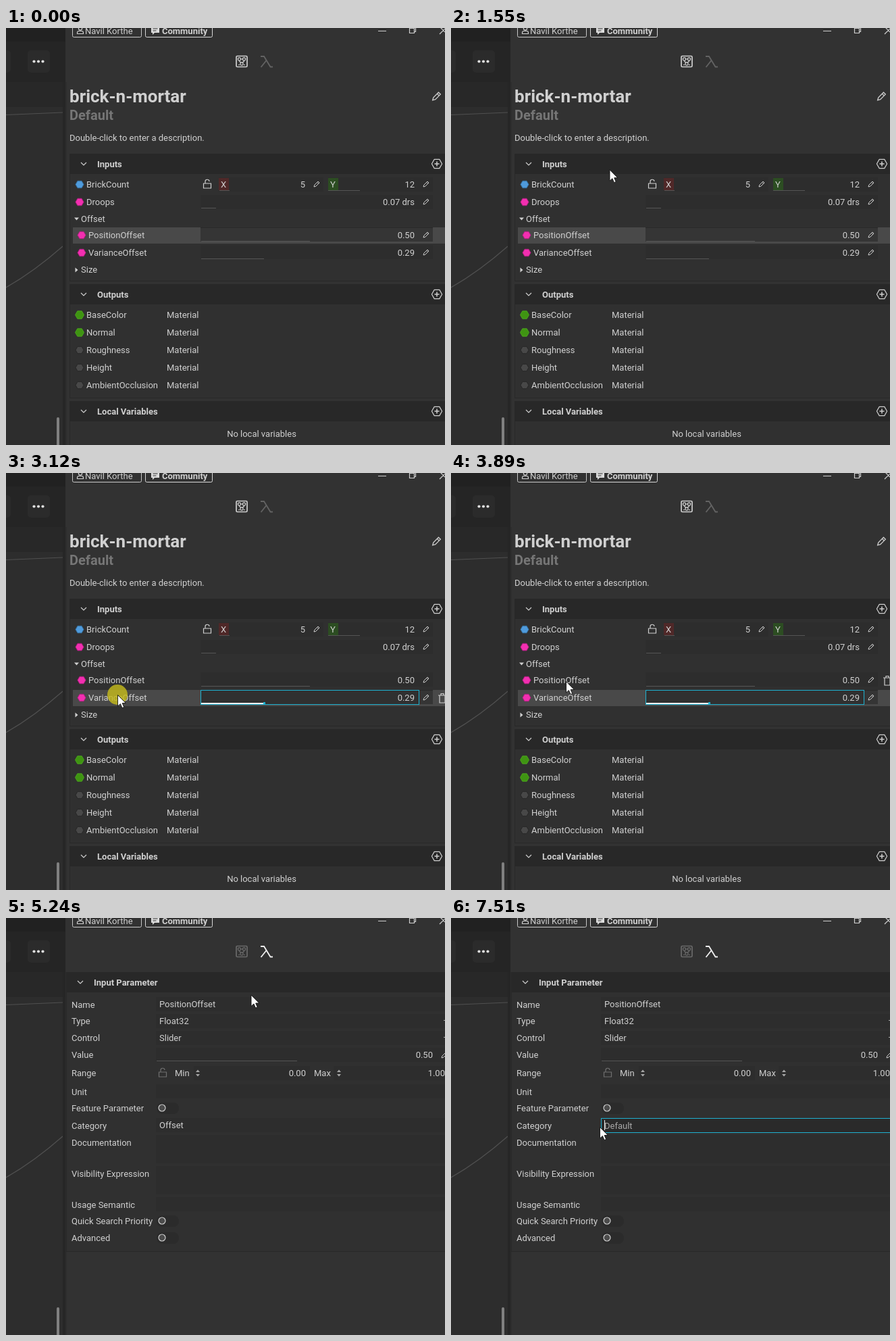
An HTML page for the animation above (8000 ms loop, 650 by 617 pixels).

```html
<!DOCTYPE html>
<html lang="en">
<head>
<meta charset="utf-8">
<title>Parameter panel</title>
<style>
html, body { margin: 0; width: 100%; height: 100%; overflow: hidden; background: #323232; }
svg { display: block; width: 650px; height: 617px; }
text { font: 13px Roboto, sans-serif; fill: #d0d0d0; white-space: pre; }
.bold { font-weight: 700; }
.line { fill: none; stroke: #cfcfcf; stroke-width: 1.2; }
.end { text-anchor: end; }
</style>
</head>
<body>
<svg id="stage" viewBox="0 0 650 617"></svg>
<script>
const rect = (x, y, w, h, fill, more = '') =>
  `<rect x="${x}" y="${y}" width="${w}" height="${h}" fill="${fill}" ${more}/>`;
const frame = (x, y, w, h, stroke, more = '') =>
  rect(x + .5, y + .5, w - 1, h - 1, 'none', `stroke="${stroke}" ${more}`);
// Text is placed by the vertical centre of its capitals.
const text = (x, cy, s, cls = '', more = '') =>
  `<text x="${x}" y="${cy + 5}" class="${cls}" ${more}>${s}</text>`;
const line = (d, more = '') => `<path class="line" d="${d}" ${more}/>`;
const at = (x, y, s, more = '') => `<g transform="translate(${x} ${y})" ${more}>${s}</g>`;
const group = (id, s) => `<g id="${id}">${s}</g>`;
const circle = (x, y, r, fill, more = '') => `<circle cx="${x}" cy="${y}" r="${r}" fill="${fill}" ${more}/>`;

const hexPath = r => {
  const h = r * .87;
  return `M${-r} 0L${-r / 2} ${-h}H${r / 2}L${r} 0L${r / 2} ${h}H${-r / 2}Z`;
};
const port = (x, y, fill, rim, r = 6) =>
  at(x, y, `<path d="${hexPath(r)}" fill="${fill}" stroke="${rim}" stroke-linejoin="round"/>`);
const pencil = (x, y, k = 1, more = '') =>
  at(x, y, line('M-4 4l.8-2.8L2-4l2 2L-1.2 3.2zM.6-2.6l2 2', `style="stroke-width:${k > 1 ? .9 : 1}" transform="scale(${k})" ${more}`));
const chevron = (x, y) => line(`M${x - 4} ${y - 2}l4 4 4-4`);
const plus = y => at(638, y, line(hexPath(7.6), 'stroke-linejoin="round"') + line('M-3.5 0h7M0-3.5v7', 'style="stroke-width:1.5"'));
const lock = (x, y, opacity = 1) =>
  at(x, y, line('M-5.5-1h11v7h-11zM-3-1v-2.5a3 3 0 0 1 6-.5'), `opacity="${opacity}"`);
const field = (x, y, w, h = 21) => rect(x, y, w, h, '#2d2d2d');
const track = (x, y, w) => rect(x, y, w, 1, '#565656');
const trash = (id, y) => at(640, y - 7, line('M0 3h12M2 3v11h8V3M4 3V.5h4V3'), `id="${id}"`);

function section(x, y, bottom, title, hasPlus) {
  return rect(x, y, 650, bottom - y, '#303030') + frame(x, y, 660, bottom - y, '#282828') +
    rect(x, y, 650, 30, '#282828') + chevron(x + 21, y + 15) +
    text(x + 41, y + 15, title, 'bold') + (hasPlus ? plus(y + 15) : '');
}

function offsetRow(id, y, label, value, width) {
  return group(id + 'Row', rect(99, y - 11, 551, 24, '#494949')) +
    field(288, y - 11, 344) +
    group(id + 'Lit', rect(288, y - 11, 344, 21, '#353535') + rect(288, y - 11, 344, 1, '#292929')) +
    track(289, y + 9, width) +
    group(id + 'Focus', rect(288, y - 11, 323, 21, '#303030') + frame(288, y - 11, 324, 22, '#1fb0cf') +
      rect(289, y + 8, width, 2, '#f4f4f4') + rect(288 + width, y + 7, 3, 3, '#1fb0cf')) +
    port(112, y + .5, '#f22fb0', '#b01f80') + text(122, y, label) +
    text(605, y, value, 'end') + pencil(622, y) + trash(id + 'Trash', y + 1);
}

function workspace() {
  return rect(0, 0, 90, 617, '#2d2d2d') + rect(0, 0, 90, 20, '#212121') + rect(0, 20, 90, 60, '#252525') +
    rect(0, 80, 85, 37, '#282828') +
    line('M0 128.500L84 125', 'style="stroke:#505050"') +
    line('M0 384Q42 360 84 323', 'style="stroke:#505050"') +
    rect(-10, 33, 17, 33, '#2b2b2b', 'rx="5"') + rect(32, 33, 33, 33, '#2b2b2b', 'rx="5"') +
    [41.5, 48, 54.500].map(x => circle(x, 49.5, 2.1, '#dedede')).join('') +
    rect(75, 576, 4, 60, '#808080', 'rx="2"') + rect(84, 80, 4, 537, '#262626') + rect(88, 0, 562, 80, '#323232');
}

function topBar() {
  return frame(98, -10, 103, 25, '#c8c8c8', 'rx="2"') + circle(110, 1.5, 2.6, 'none', 'stroke="#cfcfcf" stroke-width="1.2"') +
    line('M105.500 9.500v-1.500q0-2.500 2.500-2.500h4q2.500 0 2.500 2.500v1.500z') + text(117, 5, 'Navil Korthe') +
    frame(206, -10, 100, 25, '#d8d8d8', 'rx="2"') +
    '<path d="M215-2h12v10h-7l-3 3v-3h-2z" fill="#dcdcdc"/>' + line('M217.500 2h7M217.500 5h5', 'style="stroke:#323232"') +
    text(231, 5, 'Community', 'bold') +
    line('M551 5.500h12M597.500 1.500h7v7h-7zM599.500 1.500v-2h7v7h-2M642-1l11 11M653-1l-11 11');
}

function tabs() {
  return group('graphTab', line('M342.500 41.500h13q1.500 0 1.500 1.500v13q0 1.500-1.500 1.500h-13q-1.500 0-1.500-1.500v-13q0-1.500 1.500-1.500z', 'style="stroke-width:1.7"') +
      [[345.5, 46], [352.5, 46], [349, 53]].map(([x, y]) => circle(x, y, 2.1, 'none', 'class="line"')).join('') +
      line('M345 48.500l3 3M353 48.500l-3 3M344 54.500h2M352 54.500h2M348 46h2')) +
    line('M377 42h5l9.500 15.500h3.500M385.500 48l-8 10', 'id="lambda" style="stroke-width:1.8"');
}

function graphPanel() {
  const outputs = ['BaseColor', 'Normal', 'Roughness', 'Height', 'AmbientOcclusion'];
  return text(94, 105, 'brick-n-mortar', 'bold', 'id="title" style="font-size:26px"') +
    text(94, 131, 'Default', 'bold', 'style="font-size:20px;fill:#767676"') +
    pencil(637.5, 101, 1.45, 'id="titlePen"') + text(94, 162, 'Double-click to enter a description.') +
    section(94, 186, 375, 'Inputs', true) +
    port(109, 231.5, '#4f9bdc', '#35709f') + text(119, 231, 'BrickCount') + lock(298, 231) +
    field(315, 221, 155) + rect(315, 222, 15, 18, '#4f2828') + text(318, 231, 'X') + track(316, 240, 15) +
    text(443, 231, '5', 'end') + pencil(460, 231) +
    field(477, 221, 155) + rect(477, 222, 15, 18, '#2c4d22') + text(480, 231, 'Y') + track(477, 240, 47) +
    text(605, 231, '12', 'end') + pencil(622, 231) +
    port(109, 257.5, '#f22fb0', '#b01f80') + text(119, 257, 'Droops') + field(288, 247, 344) + track(289, 266, 22) +
    text(605, 257, '0.07 drs', 'end') + pencil(622, 257) +
    '<path d="M101 280.500h7l-3.500 4zM102.500 354.500v7l4-3.500z" fill="#d0d0d0"/>' +
    text(111, 282, 'Offset') + text(111, 357, 'Size') +
    offsetRow('position', 306, 'PositionOffset', '0.50', 161) +
    offsetRow('variance', 332, 'VarianceOffset', '0.29', 93) +
    section(94, 379, 548, 'Outputs', true) +
    outputs.map((name, i) => {
      const y = 424 + i * 26;
      return (i < 2 ? port(109, y + .5, '#3f9412', '#4aa51c', 6.5) : port(109, y + .5, '#484848', '#262626')) +
        text(119, y, name) + text(238, y, 'Material');
    }).join('') +
    section(94, 552, 630, 'Local Variables', true) +
    text(378.5, 600, 'No local variables', '', 'text-anchor="middle"');
}

function parameterPanel() {
  const labels = [['Name', 128], ['Type', 152], ['Control', 177], ['Value', 202], ['Range', 229], ['Unit', 257],
    ['Feature Parameter', 281], ['Category', 307], ['Documentation', 332], ['Visibility Expression', 378],
    ['Usage Semantic', 424], ['Quick Search Priority', 448], ['Advanced', 473]];
  const toggle = y => rect(223, y - 8, 33, 17, '#2b2b2b', 'rx="8"') + circle(231, y, 5, '#4c4c4c', 'stroke="#d0d0d0" stroke-width="1.2"');
  const spinner = x => `<path d="M${x - 3} 228l3-3.500 3 3.500zM${x - 3} 231l3 3.500 3-3.500z" fill="#a8a8a8"/>`;
  return section(89, 80, 494, 'Input Parameter', false) +
    labels.map(([s, y]) => text(97, y, s)).join('') +
    [117, 142, 167, 192, 246, 296, 413].map(y => field(222, y, 428)).join('') +
    field(222, 321, 428, 42) + field(222, 367, 428, 42) + field(278, 219, 172) + field(485, 219, 165) +
    text(227, 127, 'PositionOffset') + text(227, 152, 'Float32') + text(227, 177, 'Slider') +
    rect(648, 151, 2, 1, '#aaa') + rect(648, 176, 2, 1, '#aaa') +
    text(632, 202, '0.50', 'end') + track(223, 211, 208) + pencil(649, 203) +
    lock(232, 229, .4) + text(250, 229, 'Min') + spinner(284) + text(444, 229, '0.00', 'end') +
    text(456, 229, 'Max') + spinner(493) + text(650, 229, '1.00', 'end') +
    [281, 448, 473].map(toggle).join('') +
    group('categoryFocus', rect(222, 296, 430, 21, '#2a2a2a') + frame(222, 296, 440, 22, '#1fb0cf')) +
    rect(227, 299, 0, 15, '#1b7f99', 'id="selection"') +
    text(227, 306, 'Offset', '', 'id="category"') +
    text(227, 307, 'Default', '', 'id="placeholder" style="fill:#a8a8a8"') +
    rect(264, 299, 1, 15, '#f0f0f0', 'id="caret"');
}

const pointer = group('pointer', circle(0, 0, 15, '#c4b91c', 'id="press" fill-opacity=".82"') +
  '<path id="arrow" d="M.5 .5V17L4.400 13.500 7 19.500 9.700 18.400 7.200 12.500H12.300Z" fill="#fff" stroke="#111" stroke-width=".9"/>' +
  line('M-1-7h3M3-7h3M2.500-6.500v14M-1 8h3M3 8h3', 'id="beam" style="stroke:#f4f4f4"'));

document.getElementById('stage').innerHTML = workspace() + at(0, -1, topBar()) + tabs() +
  group('graphPanel', graphPanel()) + group('parameterPanel', parameterPanel()) + pointer;

// Pointer path: time, x, y
const path = [
  [340, 300, 491], [560, 278, 360], [760, 252, 240], [920, 288, 142], [1040, 319, 101], [1110, 322, 96], [1150, 322, 96],
  [1260, 318, 76], [1500, 250, 180], [1720, 185, 310], [1870, 166, 334], [2170, 166, 334],
  [2480, 300, 16], [2800, 137, 315], [2960, 165, 328], [3200, 165, 328],
  [3480, 220, 162], [3700, 225, 230], [3890, 170, 308], [3990, 170, 308], [4220, 315, 160], [4440, 388, 52], [5020, 388, 52],
  [5400, 335, 180], [5790, 282, 310], [5895, 282, 310], [5940, 268, 310], [6200, 246, 310], [6550, 220, 309], [8000, 220, 309]
];
const presses = [[2030, 2800], [3120, 3860], [3920, 4010], [4720, 4800], [5780, 6850]];

// Slope at a key, zero where the pointer rests or turns.
function slope(i, axis) {
  const a = path[i - 1], b = path[i], c = path[i + 1];
  if (!a || !c || (b[axis] - a[axis]) * (c[axis] - b[axis]) <= 0) return 0;
  return (c[axis] - a[axis]) / (c[0] - a[0]);
}

function pointerAt(t, axis) {
  const i = Math.max(0, path.findIndex(k => k[0] > t) - 1);
  const a = path[i], b = path[i + 1], d = b[0] - a[0];
  const u = Math.max(0, (t - a[0]) / d), u2 = u * u, u3 = u2 * u;
  return a[axis] * (2 * u3 - 3 * u2 + 1) + b[axis] * (3 * u2 - 2 * u3) +
    d * (slope(i, axis) * (u3 - 2 * u2 + u) + slope(i + 1, axis) * (u3 - u2));
}

const el = id => document.getElementById(id);
const show = (id, on) => el(id).style.display = on ? '' : 'none';
const within = (v, a, b) => v >= a && v < b;

function draw() {
  const t = performance.now() % 8000;
  const x = pointerAt(t, 1), y = pointerAt(t, 2);
  const visible = t >= 340, pressed = presses.some(([a, b]) => within(t, a, b));
  const typing = within(t, 5700, 6880), parameters = t >= 4840;

  show('pointer', visible);
  el('pointer').setAttribute('transform', `translate(${x.toFixed(1)} ${y.toFixed(1)})`);
  show('press', pressed);
  show('arrow', !typing);
  show('beam', typing);

  show('graphPanel', !parameters);
  show('parameterPanel', t >= 5020);
  el('graphTab').style.opacity = parameters ? .35 : 1;
  const onLambda = visible && within(y, 36, 66) && within(x, 370, 400);
  el('lambda').style.stroke = parameters ? '#f0f0f0' : onLambda ? '#c4c4c4' : '#636363';

  const onTitle = visible && !pressed && within(y, 86, 146);
  el('title').style.fill = onTitle ? '#fff' : '#d0d0d0';
  el('titlePen').style.stroke = onTitle ? '#fff' : '#cfcfcf';

  const selected = within(t, 2030, 3940) ? 'variance' : 'position';
  for (const [id, top] of [['position', 295], ['variance', 321]]) {
    show(id + 'Row', id === selected);
    show(id + 'Lit', id === selected);
    show(id + 'Focus', id === selected && t >= 2030);
    show(id + 'Trash', visible && within(y, top, top + 25));
  }

  const cleared = t >= 7450, left = Math.min(264, Math.max(227, x));
  show('categoryFocus', t >= 5780);
  show('category', !cleared);
  show('placeholder', cleared);
  show('caret', within(t, 5780, 7450) || t >= 7510);
  el('caret').setAttribute('x', cleared ? 227 : left);
  el('selection').setAttribute('x', left);
  el('selection').setAttribute('width', within(t, 5700, 7450) ? 264 - left : 0);
  requestAnimationFrame(draw);
}
draw();
</script>
</body>
</html>
```
